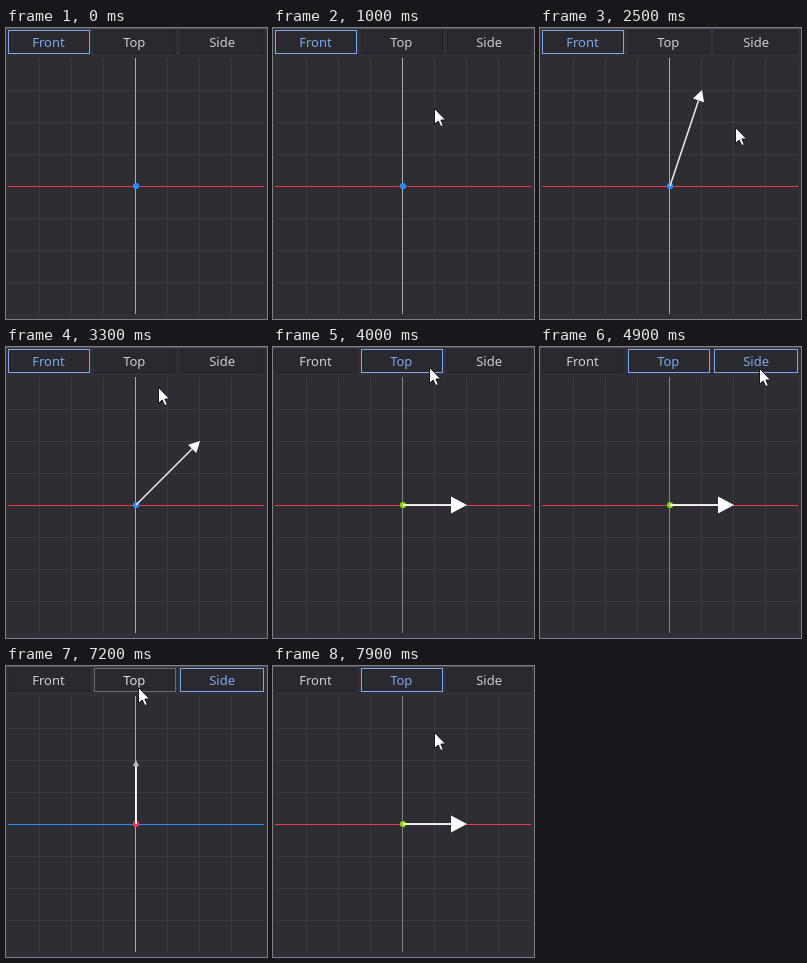
Write an HTML page that moves like this. It is 261x291 px and loops after 8 s.

```html
<!DOCTYPE html>
<html lang="en">
<head>
<meta charset="utf-8">
<title>Vector views</title>
<style>
html, body { margin: 0; width: 100%; height: 100%; overflow: hidden; background: #302e36; }
svg { display: block; width: 261px; height: 291px; }
text { font: 13px "Noto Sans", sans-serif; fill: #cdcdd0; }
.button rect { fill: #2a292f; stroke: #25242a; }
.hover rect { stroke: #6c6c70; }
.hover text { fill: #dedee0; }
.active rect { stroke: #7fa9e6; }
.active text { fill: #7fa9e6; }
.grid { stroke: #fff; stroke-opacity: .06; }
</style>
</head>
<body>
<svg viewBox="0 0 261 291">
  <rect width="261" height="291" fill="#302e36"/>
  <rect width="261" height="1" fill="#4e4e52"/>
  <rect x="2" y="30" width="256" height="256" fill="#2f2d34"/>
  <g id="buttons"></g>
  <path id="columns" class="grid"/>
  <path id="rows" class="grid"/>
  <path id="vertical" d="M129.5 30V286"/>
  <path id="horizontal" d="M2 158.5H258"/>
  <circle id="origin" cx="130" cy="158" r="3.1"/>
  <g id="arrow">
    <path id="shaft" stroke="#fff" stroke-opacity=".9"/>
    <path id="head"/>
  </g>
  <path id="cursor" d="M.5 .5V16.3L4.2 13L6.8 18.6L9.3 17.5L6.9 12H11.6Z" fill="#fff" stroke="#17161a" stroke-linejoin="round"/>
</svg>
<script>
const $ = id => document.getElementById(id);
const set = (el, attrs) => Object.entries(attrs).forEach(([k, v]) => el.setAttribute(k, v));

const LOOP = 8000, STEP = 100, CELL = 32, CX = 130, CY = 158;
const RED = '#f53352', GREEN = '#87d603', BLUE = '#288cf5', PALE = '#acacae', GREY = '#818286';

// x and y say which parts of the vector a view shows
const views = {
  Front: { x: 1, y: 1, across: RED, up: PALE, origin: BLUE, head: 11, line: 1.5, tip: '#fff' },
  Top: { x: 1, y: 0, across: RED, up: GREY, origin: GREEN, head: 16, line: 2, tip: '#fff' },
  Side: { x: 0, y: 1, across: BLUE, up: PALE, origin: RED, head: 6, line: 2, tip: '#b8b8ba' }
};
const names = Object.keys(views);
const left = name => 2 + 86 * names.indexOf(name);
const width = name => name === 'Side' ? 84 : 82;

// Pointer moves: the pointer rests between them
const entry = { x: 238, y: 54 };
const moves = [
  { from: 400, to: 1000, x: 161, y: 80, sag: 25 },
  { from: 1000, to: 1300, x: 163, y: 63 },
  { from: 1800, to: 2000, x: 202, y: 125 },
  { from: 2000, to: 2600, x: 193, y: 94 },
  { from: 2900, to: 3100, x: 179, y: 79 },
  { from: 3200, to: 3300, x: 152, y: 40 },
  { from: 3300, to: 3800, x: 156, y: 20 },
  { from: 4600, to: 4900, x: 219, y: 21 },
  { from: 5500, to: 5600, x: 179, y: 67 },
  { from: 6400, to: 6500, x: 135, y: 26 },
  { from: 6500, to: 7300, x: 132, y: 20 },
  { from: 7400, to: 7500, x: 133, y: 31 },
  { from: 7800, to: 7900, x: 161, y: 66 }
];
const plots = [1400, 2600];
const presses = [
  { down: 3800, up: 4000, name: 'Top' },
  { down: 4900, up: 5500, name: 'Side' },
  { down: 7300, up: 7400, name: 'Top' }
];

$('buttons').innerHTML = names.map(name =>
  `<g class="button" id="${name}"><rect x="${left(name) + .5}" y="2.5" width="${width(name) - 1}" height="23"/>
   <text y="19">${name}</text></g>`).join('');
for (const name of names) {
  const label = $(name).querySelector('text');
  const start = left(name) + (width(name) - 1 - label.getComputedTextLength()) / 2;
  label.setAttribute('x', Math.round(start) + .2); // whole pixels keep the glyphs crisp
}

let columns = '', rows = '';
for (let i = 1; i < 8; i++) {
  columns += `M${i * CELL + 1.5} 30V286`;
  rows += `M2 ${i * CELL + 30.5}H258`;
}
$('columns').setAttribute('d', columns);
$('rows').setAttribute('d', rows);

function pointerAt(t) {
  let { x, y } = entry;
  for (const move of moves) {
    if (t <= move.from) break;
    const k = Math.min(1, (t - move.from) / (move.to - move.from));
    x += (move.x - x) * k;
    y += (move.y - y) * k + (move.sag || 0) * Math.sin(Math.PI * k);
  }
  return { x: Math.round(x), y: Math.round(y) };
}

// Each plotting click snaps the vector to the nearest grid crossing
function vectorAt(t) {
  const click = plots.filter(p => p <= t).pop();
  if (!click) return null;
  const { x, y } = pointerAt(click);
  const snap = d => Math.round(d / CELL) * CELL;
  return { x: snap(x - CX), y: snap(y - CY) };
}

function drawArrow(vector, view) {
  set($('arrow'), { visibility: vector ? 'visible' : 'hidden' });
  if (!vector) return;
  const dx = vector.x * view.x, dy = vector.y * view.y, size = Math.hypot(dx, dy);
  const ux = dx / size, uy = dy / size, half = view.head * .53;
  const tx = CX + dx, ty = CY + dy;
  const bx = tx - ux * view.head, by = ty - uy * view.head;
  set($('shaft'), { d: `M${CX} ${CY}L${bx} ${by}`, 'stroke-width': view.line });
  set($('head'), {
    d: `M${tx} ${ty}L${bx - uy * half} ${by + ux * half}L${bx + uy * half} ${by - ux * half}Z`,
    fill: view.tip
  });
}

function draw(t) {
  const shown = presses.reduce((name, press) => t >= press.up ? press.name : name, 'Front');
  const held = presses.find(press => t >= press.down && t < press.up);
  const view = views[shown], { x, y } = pointerAt(t);
  for (const name of names) {
    const active = name === shown || held?.name === name;
    const hover = y <= 26 && x >= left(name) && x < left(name) + width(name);
    $(name).setAttribute('class', 'button' + (active ? ' active' : hover ? ' hover' : ''));
  }
  set($('vertical'), { stroke: view.up });
  set($('horizontal'), { stroke: view.across });
  set($('origin'), { fill: view.origin });
  drawArrow(vectorAt(t), view);
  set($('cursor'), { transform: `translate(${x} ${y})`, visibility: t < 100 ? 'hidden' : 'visible' });
}

const start = performance.now();
function tick() {
  const t = (performance.now() - start) % LOOP;
  draw(Math.floor(t / STEP) * STEP);
  requestAnimationFrame(tick);
}
tick();
</script>
</body>
</html>
```
